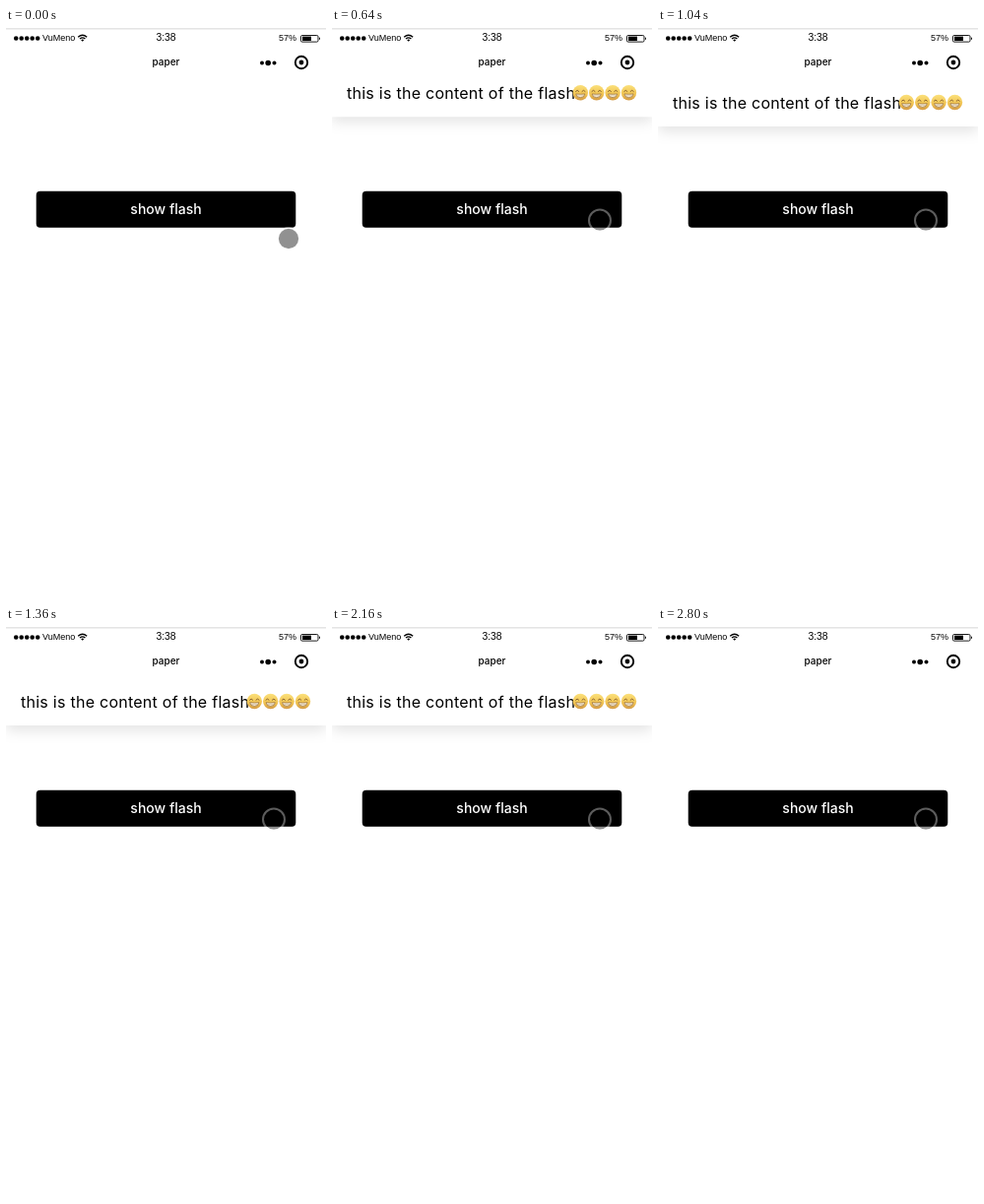
These frames come from a looping animation (325 by 580 pixels, 2880 ms). An HTML page:

```html
<!DOCTYPE html>
<html lang="en">
<head>
<meta charset="utf-8">
<title>Flash message</title>
<style>
  html, body { margin: 0; width: 100%; height: 100%; overflow: hidden; background: #fff; }
  svg { display: block; }
  text { font-family: Inter, "Noto Sans", sans-serif; }
  .status text { font-family: "Liberation Sans", Arial, sans-serif; font-size: 9px; }
  .message { font-size: 16px; letter-spacing: .26px; }
  .panel { filter: drop-shadow(0 5px 7px rgba(0, 0, 0, .11)); }
</style>
</head>
<body>
<svg width="325" height="580" viewBox="0 0 325 580">
  <defs>
    <linearGradient id="skin" x2="0" y2="1">
      <stop offset="0" stop-color="#fbe07a"/>
      <stop offset=".6" stop-color="#f0c352"/>
      <stop offset="1" stop-color="#d39a45"/>
    </linearGradient>
    <g id="grin">
      <circle r="7.7" fill="url(#skin)"/>
      <path d="M-4.8-1.4Q-3.2-3.8-1.6-1.4M1.6-1.4Q3.2-3.8 4.8-1.4" fill="none" stroke="#7d5526" stroke-width=".9" stroke-linecap="round"/>
      <path d="M-4.6 1.2Q0 1.8 4.6 1.2Q4.1 4.9 0 4.9T-4.6 1.2Z" fill="#f8efdc" stroke="#946a36" stroke-width=".7"/>
      <path d="M-4.1 3H4.1" stroke="#b99a74" stroke-width=".4"/>
    </g>
  </defs>

  <rect x="30.7" y="165.7" width="263.6" height="37" rx="4"/>
  <text x="162.5" y="189" font-size="14" font-weight="500" fill="#fff" text-anchor="middle">show flash</text>

  <g id="banner">
    <rect class="panel" y="40" width="325" height="60" fill="#fff"/>
    <text class="message" x="15" y="82">this is the content of the flash</text>
    <use href="#grin" x="252.3" y="75.5"/>
    <use href="#grin" x="268.7" y="75.5"/>
    <use href="#grin" x="285.1" y="75.5"/>
    <use href="#grin" x="301.5" y="75.5"/>
  </g>

  <rect width="325" height="50" fill="#fff"/>
  <rect width="325" height="1.5" fill="#e4e4e4"/>
  <g class="status">
    <path d="M10.2 10.5H33" stroke="#000" stroke-width="4.6" stroke-linecap="round" stroke-dasharray="0 5.5"/>
    <text x="37" y="13.2">VuMeno</text>
    <path d="M73.2 9.2Q77.7 5.3 82.2 9.2M75 11.1Q77.7 8.8 80.4 11.1" fill="none" stroke="#000" stroke-width="1.3"/>
    <path d="M76.2 12.2Q77.7 11 79.2 12.2L77.7 13.8Z"/>
    <text x="162.5" y="13.3" text-anchor="middle" style="font-size:10.3px">3:38</text>
    <text x="277" y="13.2">57%</text>
    <rect x="299.5" y="7.5" width="17.5" height="6.6" rx="1.3" fill="none" stroke="#000" stroke-width=".9"/>
    <rect x="301" y="8.6" width="9" height="4.4"/>
    <path d="M318 9.3Q320 10.8 318 12.3Z"/>
  </g>
  <text x="162.5" y="38.2" font-size="10" font-weight="500" text-anchor="middle">paper</text>
  <circle cx="260" cy="35.5" r="2"/>
  <circle cx="266.2" cy="35.5" r="2.8"/>
  <circle cx="272.5" cy="35.5" r="2"/>
  <circle cx="300" cy="35" r="6.2" fill="none" stroke="#000" stroke-width="1.9"/>
  <circle cx="300" cy="35" r="2.4"/>

  <g id="pointer">
    <circle r="10.2" fill="#000" fill-opacity=".43"/>
    <circle r="11" fill="none" stroke="#fff" stroke-opacity=".36" stroke-width="2"/>
  </g>
</svg>
<script>
const LOOP = 2880, STEP = 80, TRAVEL = 70;
const banner = document.getElementById("banner");
const pointer = document.getElementById("pointer");
const clamp = x => Math.min(1, Math.max(0, x));

// The CSS "ease" curve, cubic-bezier(.25, .1, .25, 1)
function ease(x) {
  const bezier = (a, b, s) => 3 * a * s * (1 - s) ** 2 + 3 * b * s * s * (1 - s) + s ** 3;
  let lo = 0, hi = 1;
  for (let i = 0; i < 20; i++) {
    const mid = (lo + hi) / 2;
    if (bezier(.25, .25, mid) < x) lo = mid; else hi = mid;
  }
  return bezier(.1, 1, lo);
}

const progress = (t, start, length) => ease(clamp((t - start) / length));
const move = (node, x, y) => node.setAttribute("transform", `translate(${x} ${y})`);

function draw(now) {
  const t = Math.floor(now % LOOP / STEP) * STEP;
  const shown = progress(t, 470, 300) - progress(t, 2160, 170);
  move(banner, 0, TRAVEL * (shown - 1));
  banner.style.display = shown > .01 ? "" : "none";

  const glide = progress(t, 0, 320);
  move(pointer, 287 - 15 * glide, 214 - 18.4 * glide);
}

const start = performance.now();
function tick() {
  draw(performance.now() - start);
  requestAnimationFrame(tick);
}
tick();
</script>
</body>
</html>
```
